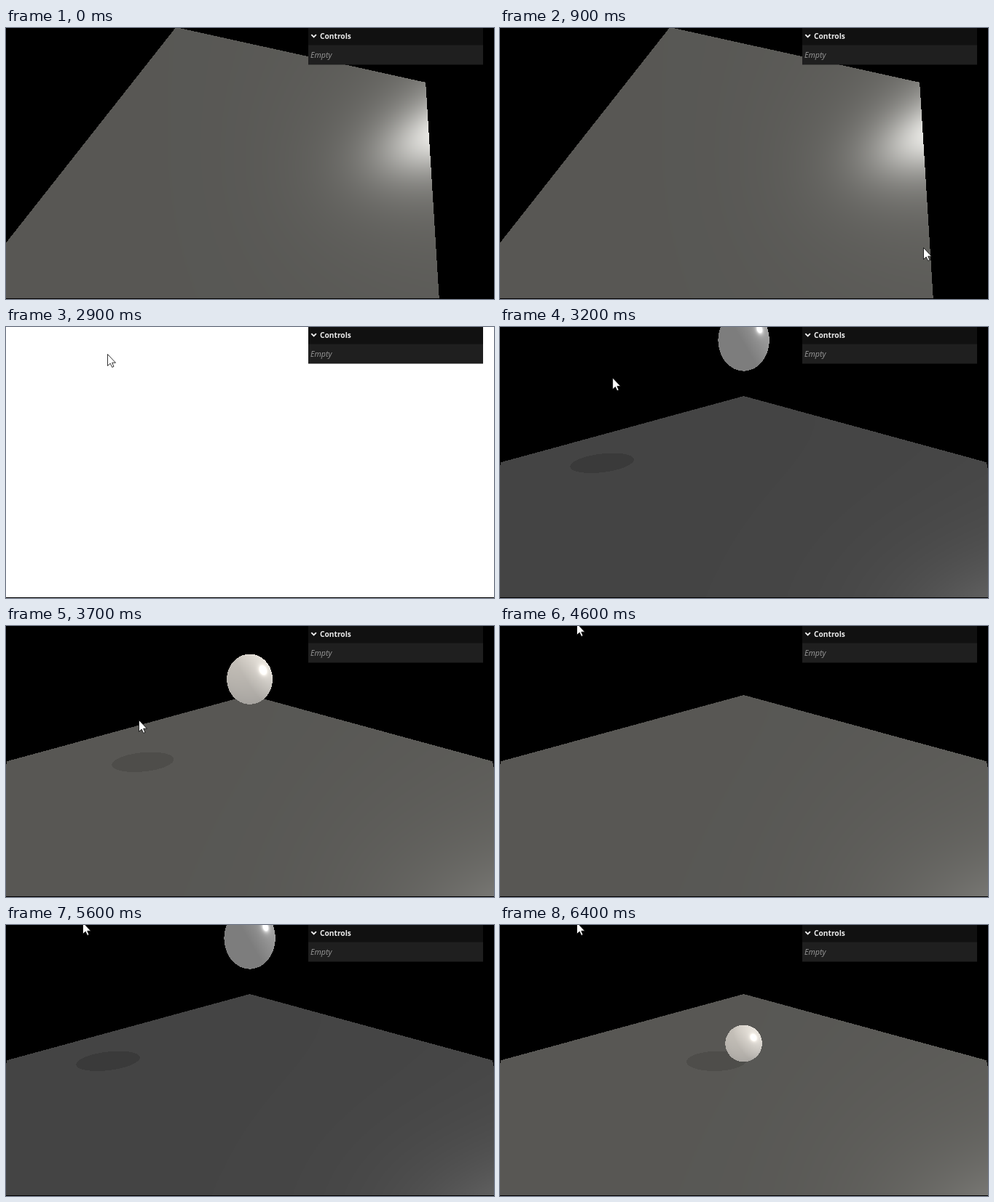
An HTML page with a canvas for the animation above (6.5 s loop, 670x373 px).

```html
<!DOCTYPE html>
<html lang="en">
<head>
<meta charset="utf-8">
<title>Falling sphere</title>
<style>
  html, body { margin: 0; width: 100%; height: 100%; overflow: hidden; background: #000; }
  #stage { position: relative; width: 670px; height: 373px; overflow: hidden; }
  canvas, svg { position: absolute; left: 0; top: 0; display: block; }
  text { font-family: "Open Sans", "Noto Sans", sans-serif; }
  .title { font-size: 10.2px; font-weight: 700; fill: #ebebeb; }
  .empty { font-size: 10.7px; font-style: italic; fill: #999; }
</style>
</head>
<body>
<div id="stage">
  <canvas id="scene" width="670" height="373"></canvas>
  <svg width="670" height="373">
    <rect x="415" width="240" height="50.5" fill="#1f1f1f"/>
    <rect x="415" width="240" height="23.5" fill="#111"/>
    <path d="M419.3 9.2l3.3 3.3 3.3-3.3" fill="none" stroke="#ebebeb" stroke-width="1.9"/>
    <text class="title" x="431" y="14.5">Controls</text>
    <text class="empty" x="418" y="41">Empty</text>
    <path id="cursor" d="M.5 .5V16.4L4.2 13.1 6.7 18.4 9 17.4 6.7 12.2H11.5Z" fill="#fff" stroke="#000" stroke-width=".8"/>
  </svg>
</div>
<script>
const W = 670, H = 372, LOOP = 6500, STEP = 100;
const FOCAL = 245, CX = 334.6, CY = 186.2, DISTANCE = Math.sqrt(27);
const RADIUS = 0.5, HALF_FLOOR = 5, HIDDEN = -9;
const LIGHT = [1, 1, 1].map(c => c / Math.sqrt(3));
const VIEWS = [{ yaw: -18.45, pitch: 67.3 }, { yaw: -45, pitch: 35.264 }].map(makeCamera);
const FLOOR = { color: 0.467, env: [19.5, 19, 16] };
const BALL = { color: 1, env: [59, 55, 49] };

const ctx = document.getElementById('scene').getContext('2d');
const cursor = document.getElementById('cursor');
const image = ctx.createImageData(W, H);

const dot = (a, b) => a[0] * b[0] + a[1] * b[1] + a[2] * b[2];
const along = (o, d, t) => [o[0] + d[0] * t, o[1] + d[1] * t, o[2] + d[2] * t];

function makeCamera({ yaw, pitch }) {
  const rad = Math.PI / 180;
  const c = Math.cos(yaw * rad), s = Math.sin(yaw * rad);
  const ce = Math.cos(pitch * rad), se = Math.sin(pitch * rad);
  const forward = [c * ce, -se, s * ce];
  return { forward, right: [-s, 0, c], up: [c * se, ce, s * se], eye: forward.map(v => -v * DISTANCE) };
}

// GGX highlight plus Lambert, metalness 0.3 and roughness 0.4
function shade(n, ray, color, lit) {
  const diffuse = color * 0.7, nl = dot(n, LIGHT);
  if (!lit || nl <= 0) return 255 * diffuse * 0.7;
  const nv = Math.max(-dot(n, ray), 0.001);
  const half = [LIGHT[0] - ray[0], LIGHT[1] - ray[1], LIGHT[2] - ray[2]];
  const len = Math.sqrt(dot(half, half));
  const nh = dot(n, half) / len, vh = dot(LIGHT, half) / len;
  const a2 = 0.0256, f0 = 0.028 + 0.3 * color;
  const d = a2 / (nh * nh * (a2 - 1) + 1) ** 2;
  const g = x => Math.sqrt(x * x * (1 - a2) + a2);
  const v = 0.5 / (nl * g(nv) + nv * g(nl));
  const f = f0 + (1 - f0) * (1 - vh) ** 5;
  return 255 * (diffuse * (0.7 + 0.2 * nl) + 0.2 * nl * d * v * f);
}

function hitBall(origin, ray, height) {
  const o = [origin[0], origin[1] - height, origin[2]];
  const b = dot(o, ray), disc = b * b - dot(o, o) + RADIUS * RADIUS;
  return disc < 0 ? null : { near: -b - Math.sqrt(disc), far: -b + Math.sqrt(disc) };
}

// value is the direct light, glow scales the surroundings' tint
function trace(cam, ray, height) {
  const hit = height > -RADIUS && hitBall(cam.eye, ray, height);
  if (hit) {
    const p = along(cam.eye, ray, hit.near);
    if (p[1] > 0) {
      const n = [p[0] / RADIUS, (p[1] - height) / RADIUS, p[2] / RADIUS];
      return { material: BALL, value: shade(n, ray, BALL.color, true), glow: 0.95 + 0.3 * n[1] };
    }
  }
  if (ray[1] >= 0) return null;
  const p = along(cam.eye, ray, -cam.eye[1] / ray[1]);
  if (Math.abs(p[0]) > HALF_FLOOR || Math.abs(p[2]) > HALF_FLOOR) return null;
  const blocker = height > -RADIUS && hitBall(p, LIGHT, height);
  const lit = !(blocker && blocker.far > 0);
  const facing = Math.max(0, dot([ray[0], -ray[1], ray[2]], LIGHT));
  return { material: FLOOR, value: shade([0, 1, 0], ray, FLOOR.color, lit), glow: 1 + 0.25 * facing ** 3 };
}

function renderScene({ view, env, height }) {
  const cam = VIEWS[view], { forward: f, right: r, up: u } = cam, px = image.data;
  for (let y = 0, i = 0; y < H; y++) {
    const b = (CY - y - 0.5) / FOCAL;
    for (let x = 0; x < W; x++, i += 4) {
      const a = (x + 0.5 - CX) / FOCAL, k = 1 / Math.sqrt(1 + a * a + b * b);
      const ray = [(f[0] + r[0] * a + u[0] * b) * k, (f[1] + u[1] * b) * k, (f[2] + r[2] * a + u[2] * b) * k];
      const hit = trace(cam, ray, height);
      for (let c = 0; c < 3; c++) px[i + c] = hit ? hit.value + (env ? hit.material.env[c] * hit.glow : 0) : 0;
      px[i + 3] = 255;
    }
  }
  ctx.putImageData(image, 0, 0);
}

const between = (t, from, to) => t >= from && t < to;
const fall = s => 3 - 4.91 * s * s;

function ballHeight(t) {
  if (between(t, 3100, 3500) || between(t, 5600, 6000)) return 2.9;
  if (between(t, 3500, 4100)) return fall(0.407 + (t - 3700) * 0.00112);
  if (t >= 6000) return fall(0.705 + (t - 6400) / 1000);
  return HIDDEN;
}

function sceneAt(t) {
  return {
    blank: between(t, 2900, 3100) || between(t, 5400, 5600),
    view: t < 2900 ? 0 : 1,
    env: !between(t, 3100, 3500) && !between(t, 5600, 6000),
    height: ballHeight(t)
  };
}

// time, x, y of the pointer tip
const POINTER = [
  [100, 210, 28], [400, 410, 165], [700, 567, 289], [900, 581, 302], [1100, 566, 318],
  [1300, 530, 311], [1400, 530, 311], [1900, 138, -7], [2800, 138, -7], [2900, 139, 37],
  [3000, 139, 37], [3500, 182, 129], [4400, 182, 129], [4600, 105, -4], [6500, 105, -4]
];

function pointerAt(t) {
  const i = Math.max(1, POINTER.findIndex(p => p[0] >= t));
  const [t0, x0, y0] = POINTER[i - 1], [t1, x1, y1] = POINTER[i];
  const k = (t - t0) / (t1 - t0), e = k * k * (3 - 2 * k);
  return [x0 + (x1 - x0) * e, y0 + (y1 - y0) * e];
}

let shown = '';
function draw(now) {
  const t = Math.floor((now % LOOP) / STEP) * STEP;
  const scene = sceneAt(t), key = JSON.stringify(scene);
  if (key !== shown) {
    shown = key;
    ctx.fillStyle = '#000';
    ctx.fillRect(0, H, W, 1);
    if (scene.blank) {
      ctx.fillStyle = '#fff';
      ctx.fillRect(0, 0, W, H);
    } else renderScene(scene);
  }
  cursor.style.visibility = t < 100 ? 'hidden' : 'visible';
  if (t >= 100) cursor.setAttribute('transform', `translate(${pointerAt(t)})`);
}

const start = performance.now();
function tick() {
  draw(performance.now() - start);
  requestAnimationFrame(tick);
}
tick();
</script>
</body>
</html>
```
